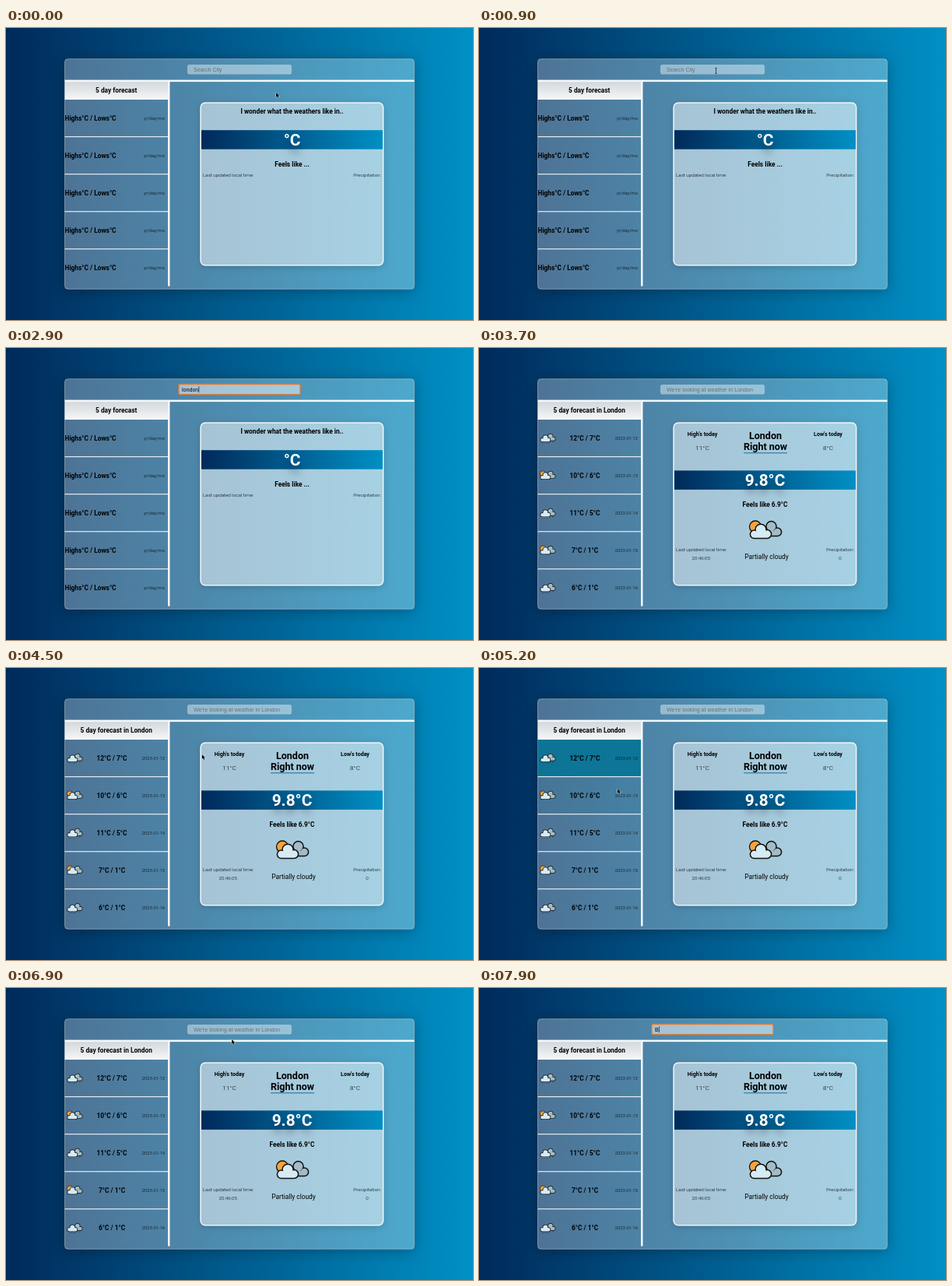
An HTML page with a canvas that plays this animation: 600x375 px, repeating every 8 s.

```html
<!DOCTYPE html>
<html lang="en">
<head>
<meta charset="utf-8">
<title>Weather</title>
<style>
  html, body { margin: 0; width: 100%; height: 100%; overflow: hidden; background: #00467c; }
  canvas { display: block; width: 600px; height: 375px; }
</style>
</head>
<body>
<canvas id="stage"></canvas>
<script>
const W = 600, H = 375, LOOP = 8000;
const canvas = document.getElementById('stage');
const dpr = window.devicePixelRatio || 1;
canvas.width = W * dpr;
canvas.height = H * dpr;
const ctx = canvas.getContext('2d');

const UI = 'Roboto, sans-serif';
const FIELD = '"Liberation Sans", Arial, sans-serif';
const ROW_TOP = 92, ROW_STEP = 48.05, MID = 367.5;
const LOADED = 3200;

const days = [
  ['12°C / 7°C', true], ['10°C / 6°C', false], ['11°C / 5°C', true],
  ['7°C / 1°C', false], ['6°C / 1°C', true]
];

// Pointer stops: time, x, y
const firstMove = [[0, 347, 83], [250, 346, 80], [650, 305, 55], [1600, 303, 54]];
const secondMove = [
  [4300, 300, 110], [4750, 192, 112], [5050, 180, 128], [5180, 178.3, 139], [5200, 178, 155],
  [5400, 177, 172], [5680, 172, 188], [5960, 163, 235.5], [6000, 162, 246],
  [6250, 160, 300], [6400, 190, 300], [6550, 235, 215], [6900, 290, 66],
  [7100, 298, 54], [7750, 298, 54]
];

// Search sessions: focus, blur, then key presses
const sessions = [
  { open: 950, close: 2950, text: 'london', keys: [1600, 1750, 2000, 2150, 2350, 2500] },
  { open: 7250, close: 9000, text: 'B', keys: [7800] }
];

const clamp = v => Math.max(0, Math.min(1, v));
const mix = (a, b, k) => a + (b - a) * k;
const ease = k => k * k * (3 - 2 * k);

function pointerAt(t) {
  for (const path of [firstMove, secondMove]) {
    for (let i = 1; i < path.length; i++) {
      const a = path[i - 1], b = path[i];
      if (t >= a[0] && t < b[0]) {
        const k = (t - a[0]) / (b[0] - a[0]);
        return { x: mix(a[1], b[1], k), y: mix(a[2], b[2], k) };
      }
    }
  }
  return null;
}

function rowAt(t) {
  const p = pointerAt(t);
  if (!p || p.x < 75 || p.x > 208 || p.y < ROW_TOP || p.y > 332) return -1;
  return Math.floor((p.y - ROW_TOP) / ROW_STEP);
}

// Linear 200 ms fade, as the share of recent time spent on the row
function hoverLevel(row, t) {
  let n = 0;
  for (let i = 0; i < 20; i++) if (rowAt(t - i * 10) === row) n++;
  return n / 20;
}

function text(str, x, y, size, { weight = 400, align = 'center', color = '#000', font = UI } = {}) {
  ctx.font = `${weight} ${size}px ${font}`;
  ctx.textAlign = align;
  ctx.fillStyle = color;
  ctx.fillText(str, x, y + size * 0.356);
}
const bold = (str, x, y, size = 8.33) => text(str, x, y, size, { weight: 700 });
const light = (str, x, y, size = 6.25, align = 'center') =>
  text(str, x, y, size, { weight: 300, align });

function rect(x, y, w, h, color) {
  ctx.fillStyle = color;
  ctx.fillRect(x, y, w, h);
}

function roundRect(x, y, w, h, r) {
  ctx.beginPath();
  ctx.roundRect(x, y, w, h, r);
}

function blues(x, w) {
  const g = ctx.createLinearGradient(x, 0, x + w, 0);
  g.addColorStop(0, '#002a5a');
  g.addColorStop(1, '#0090c5');
  return g;
}

function glass(x, y, w, h, r, alpha, line, lineWidth, blur, shade) {
  ctx.save();
  ctx.beginPath();
  ctx.rect(0, 0, W, H);
  ctx.roundRect(x, y, w, h, r);
  ctx.clip('evenodd');
  ctx.shadowColor = `rgba(0,0,0,${shade})`;
  ctx.shadowBlur = blur * dpr;
  ctx.shadowOffsetY = 2 * dpr;
  roundRect(x, y, w, h, r);
  ctx.fillStyle = '#000';
  ctx.fill();
  ctx.restore();
  roundRect(x, y, w, h, r);
  ctx.fillStyle = `rgba(255,255,255,${alpha})`;
  ctx.fill();
  ctx.strokeStyle = line;
  ctx.lineWidth = lineWidth;
  ctx.stroke();
}

function blob(puffs, grow, color) {
  ctx.beginPath();
  for (const [x, y, r] of puffs) {
    ctx.moveTo(x, y);
    ctx.arc(x, y, r + grow, 0, 7);
  }
  const a = puffs[0], b = puffs[2], base = a[1] + a[2];
  ctx.rect(a[0], a[1] - 2, b[0] - a[0], base - a[1] + 2 + grow);
  ctx.fillStyle = color;
  ctx.fill();
}

function cloud(puffs, color) {
  blob(puffs, 0.75, '#111');
  blob(puffs, -0.75, color);
}

function weatherIcon(x, y, scale, rain) {
  ctx.save();
  ctx.translate(x, y);
  ctx.scale(scale, scale);
  cloud([[0, 2.5, 5], [8, -4.8, 6.6], [15.8, 2.2, 5.3]], '#a3bcc6');
  if (rain) {
    ctx.strokeStyle = '#1d3a50';
    ctx.lineWidth = 1.3;
    ctx.beginPath();
    for (let i = 0; i < 4; i++) {
      ctx.moveTo(-12 + i * 6, 12.5);
      ctx.lineTo(-13.5 + i * 6, 16.5 - i % 2 * 2);
    }
    ctx.moveTo(15, 9);
    ctx.lineTo(13.5, 12.5);
    ctx.stroke();
  } else {
    ctx.beginPath();
    ctx.arc(-12.5, -4.5, 7.5, 0, 7);
    ctx.fillStyle = '#f7a33c';
    ctx.fill();
    ctx.strokeStyle = '#111';
    ctx.lineWidth = 1.3;
    ctx.stroke();
  }
  cloud([[-13.8, 5.2, 5.3], [-5.5, -0.8, 7], [2.6, 5, 5.5]], '#d6ebf3');
  ctx.restore();
}

function drawSearch(t) {
  let open = 0, focused = false, typed = '', last = 0;
  for (const s of sessions) {
    if (t < s.open || t > s.close + 300) continue;
    focused = t < s.close;
    open = ease(clamp((t - s.open) / 300)) * (1 - ease(clamp((t - s.close) / 300)));
    const count = s.keys.filter(k => t >= k).length;
    if (focused) typed = s.text.slice(0, count);
    last = count ? s.keys[count - 1] : s.open;
  }
  const x = mix(233, 222, open), y = mix(47, 46.5, open);
  const w = 600 - 2 * x, h = mix(12.4, 13.2, open);
  roundRect(x, y, w, h, mix(2.5, 1.5, open));
  ctx.fillStyle = `rgba(255,255,255,${mix(0.42, 0.5, open)})`;
  ctx.fill();
  if (focused) {
    ctx.strokeStyle = '#e07b35';
    ctx.lineWidth = 1.3;
    ctx.stroke();
  }
  const left = mix(241, 226, open);
  const hint = t < LOADED ? 'Search City' : "We're looking at weather in London";
  text(typed || hint, left, 53.2, 7.1,
    { align: 'left', font: FIELD, color: typed ? '#000' : '#6a7076' });
  if (focused && (t - last) % 1000 < 500) {
    const end = typed ? ctx.measureText(typed).width + 0.3 : 0;
    rect(left + end, 49.2, 0.6, 8, '#000');
  }
}

function drawForecast(t, loaded) {
  const g = ctx.createLinearGradient(0, 69, 0, 92);
  g.addColorStop(0, '#d3d8dc');
  g.addColorStop(1, '#f6f7f8');
  rect(75.5, 69, 132.5, 23, g);
  bold(loaded ? '5 day forecast in London' : '5 day forecast', 141.7, 80.3);
  days.forEach(([temps, rain], i) => {
    const top = ROW_TOP + i * ROW_STEP, y = top + 23.6;
    const level = hoverLevel(i, t);
    if (level) rect(75.5, top, 132.5, 47.3, `rgba(0,117,150,${0.93 * level})`);
    if (i < 4) rect(75.5, top + 47, 132.5, 1.2, 'rgba(255,255,255,.85)');
    if (loaded) {
      weatherIcon(88, y, 0.48, rain);
      bold(temps, 136, y);
      light('2023-01-' + (12 + i), 204, y, 5.83, 'right');
    } else {
      text('Highs°C / Lows°C', 75.5, y, 8.33, { weight: 700, align: 'left' });
      light('yr/day/mo', 204, y, 5.83, 'right');
    }
  });
}

function drawBand(str, top) {
  rect(251, top, 233, 24.5, blues(251, 233));
  ctx.save();
  ctx.shadowColor = 'rgba(0,0,0,.35)';
  ctx.shadowBlur = 10 * dpr;
  ctx.shadowOffsetY = 10 * dpr;
  text(str, MID, top + 12.4, 20.83, { weight: 700, color: '#fff' });
  ctx.restore();
}

function drawCard(loaded) {
  glass(250, 96, 234.7, 208.7, 6, 0.5, 'rgba(255,255,255,.88)', 1.5, 10, 0.2);
  if (!loaded) {
    bold('I wonder what the weathers like in..', MID, 106.8);
    drawBand('°C', 131.2);
    bold('Feels like ...', MID, 174.6);
    light('Last updated local time:', 253, 188.4, 6.25, 'left');
    light('Precipitation:', 482, 188.4, 6.25, 'right');
    return;
  }
  bold("High's today", 287, 110.2, 7.08);
  bold("Low's today", 448.5, 110.2, 7.08);
  light('11°C', 287, 128.2, 8.1);
  light('8°C', 448.5, 128.2, 8.1);
  bold('London', 368, 112.2, 12.5);
  bold('Right now', 368, 127, 12.5);
  rect(340, 134.3, 56, 1, '#1f6a98');
  drawBand('9.8°C', 157.4);
  bold('Feels like 6.9°C', MID, 201);
  weatherIcon(367.5, 234, 1, false);
  text('Partially cloudy', 369.5, 268.5, 8.33);
  light('Last updated local time:', 253, 258.6, 6.25, 'left');
  light('20:46:05', 285.3, 270.2);
  light('Precipitation:', 482, 258.6, 6.25, 'right');
  light('0', 464, 270.2);
}

function drawPointer(t) {
  const p = pointerAt(t);
  if (!p) return;
  ctx.save();
  ctx.translate(p.x, p.y);
  if (p.y > 47 && p.y < 60 && p.x > 222 && p.x < 378) {
    rect(-0.35, -3.5, 0.7, 7, '#111');
    rect(-1.3, -3.8, 2.6, 0.6, '#111');
    rect(-1.3, 3.2, 2.6, 0.6, '#111');
  } else {
    ctx.beginPath();
    for (const [x, y] of [[0, 0], [0, 6], [1.4, 4.8], [2.4, 7], [3.4, 6.5], [2.5, 4.4], [4.3, 4.3]])
      ctx.lineTo(x, y);
    ctx.closePath();
    ctx.strokeStyle = 'rgba(255,255,255,.9)';
    ctx.lineWidth = 0.9;
    ctx.stroke();
    ctx.fillStyle = '#000';
    ctx.fill();
  }
  ctx.restore();
}

function draw(t) {
  const loaded = t >= LOADED;
  ctx.setTransform(dpr, 0, 0, dpr, 0, 0);
  rect(0, 0, W, H, blues(0, W));
  glass(75.5, 39.7, 449, 295.6, 4, 0.3, 'rgba(255,255,255,.4)', 1, 18, 0.3);
  drawForecast(t, loaded);
  rect(75.5, 66.6, 449, 2.5, '#f4f8fa');
  rect(208, 69, 2.5, 262.5, '#f4f8fa');
  drawSearch(t);
  drawCard(loaded);
  drawPointer(t);
}

const start = performance.now();
function tick() {
  draw((performance.now() - start) % LOOP);
  requestAnimationFrame(tick);
}
tick();
</script>
</body>
</html>
```
